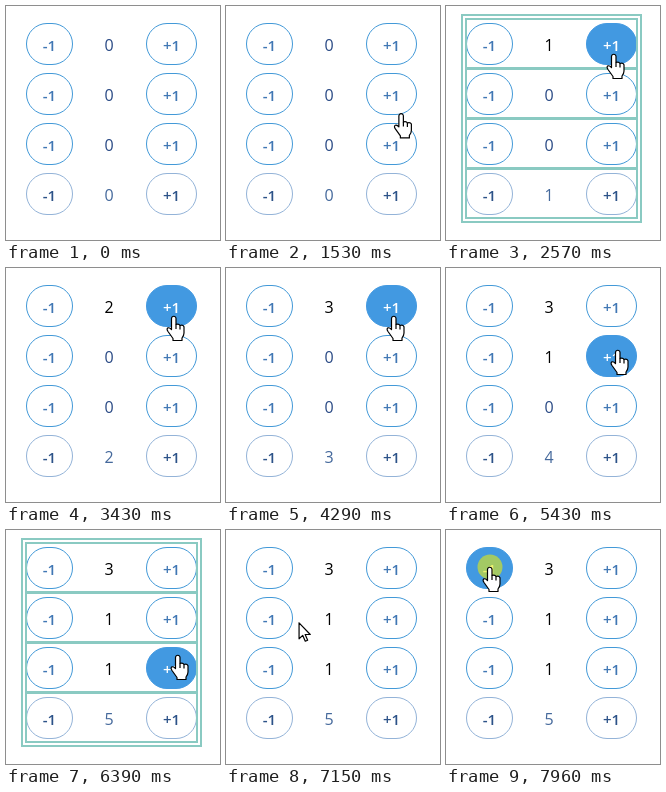
These frames come from a looping animation (214 px wide and 234 px high, 8000 ms). An HTML page:

```html
<!DOCTYPE html>
<html lang="en">
<head>
<meta charset="utf-8">
<title>Counters</title>
<style>
  html, body { margin: 0; width: 100%; height: 100%; overflow: hidden; background: #fff; }
  svg { display: block; width: 214px; height: 234px; }
  text { font: 16px "Open Sans", "Noto Sans", sans-serif; text-anchor: middle; fill: #000; }
  .btn rect { fill: #fff; stroke: #4299d8; }
  .btn text { font-size: 15px; font-weight: 600; fill: #4077b4; }
  .total .btn rect { stroke: #93b3d8; }
  .total .btn text { fill: #2c5288; }
  .zero { fill: #2a4a85; }
  .total .count { fill: #45699c; }
  .btn.hover rect { fill: #4299e1; stroke: #4299e1; }
  .btn.hover text { fill: #fff; }
  #flash { fill: none; stroke: #8acac2; stroke-width: 2; }
  #press { fill: rgba(228, 233, 17, .6); }
  #hand, #arrow { fill: #fff; stroke: #000; stroke-width: 1.2; stroke-linejoin: round; }
</style>
</head>
<body>
<svg viewBox="0 0 214 234">
  <g id="rows"></g>
  <g id="flash"><rect x="16" y="9" width="179" height="207"/></g>
  <circle id="press" r="12.5"/>
  <g id="cursor">
    <g id="hand">
      <path d="M-2.5 13.5V2.5a2.2 2.2 0 0 1 4.5 0V8.5q3-1 4 1q3-1 4 1.2V17q0 2.5-2 5V24.5H-1V22.5L-6 15.5q-1.8-2.7 0-3.6q1.6-.6 3.5 1.6z"/>
      <path d="M2 8.5V13M6 9.5V13.5" fill="none"/>
    </g>
    <path id="arrow" d="M0 0V16L3.7 12.6L6.2 18.4L8.6 17.4L6.1 11.7H11.2Z"/>
  </g>
</svg>
<script>
const LOOP = 8000;
const $ = id => document.getElementById(id);

function add(parent, tag, attrs, label) {
  const el = document.createElementNS("http://www.w3.org/2000/svg", tag);
  for (const key in attrs) el.setAttribute(key, attrs[key]);
  if (label !== undefined) el.textContent = label;
  parent.appendChild(el);
  return el;
}

const buttons = [], counts = [];

function addButton(row, label, x, y, w) {
  const el = add(row, "g", { class: "btn" });
  add(el, "rect", { x: x + .5, y: y + .5, width: w - 1, height: 41, rx: 20.5 });
  add(el, "text", { x: x + w / 2, y: y + 28 }, label);
  buttons.push({ el, x, y, w });
}

for (let i = 0; i < 4; i++) {
  const y = 17 + 50 * i;
  const row = add($("rows"), "g", { class: i === 3 ? "total" : "" });
  addButton(row, "-1", 20, y, 47);
  addButton(row, "+1", 140, y, 51);
  counts.push(add(row, "text", { x: 103, y: y + 28 }, 0));
  add($("flash"), "rect", { x: 20, y: y - 4, width: 171, height: 49 });
}

// Cursor moves: first step, last step, number of steps, end point
const enter = [192, 244];
const moves = [
  [1180, 1810, 10, 169, 55],
  [1960, 2160, 4, 168, 48],
  [4490, 4770, 5, 172, 82],
  [5780, 6130, 6, 172, 125],
  [6660, 7420, 12, 46, 84],
  [7490, 7700, 4, 44, 37]
];

// Clicks: press, count changes, outline ends, row
const clicks = [
  [2360, 2500, 2770, 0],
  [2970, 3170, 3430, 0],
  [3900, 4030, 4290, 0],
  [4970, 5170, 5430, 1],
  [6250, 6390, 6660, 2],
  [7960, 8100, 8400, 0]
];

const ease = p => 1 - Math.pow(1 - p, 1.4);

function cursorAt(t) {
  let [x, y] = enter;
  for (const [start, end, n, toX, toY] of moves) {
    if (t < start) break;
    const step = Math.floor((t - start) / ((end - start) / (n - 1)) + 1e-6) + 1;
    const p = ease(Math.min(1, step / n));
    x += (toX - x) * p;
    y += (toY - y) * p;
  }
  return [x, y];
}

function inside(b, x, y) {
  const r = 21;
  const dx = Math.max(b.x + r - x, 0, x - (b.x + b.w - r));
  return Math.hypot(dx, y - b.y - r) <= r;
}

const show = (el, on) => el.setAttribute("visibility", on ? "visible" : "hidden");

function draw(t) {
  const [x, y] = cursorAt(t);
  const over = buttons.find(b => inside(b, x, y));
  const at = `translate(${x} ${y})`;
  const active = t >= 1600;  // buttons do not react during the fast entry
  for (const b of buttons) b.el.classList.toggle("hover", active && b === over);

  const values = [0, 0, 0, 0];
  let pressed = false, flash = false;
  for (const [down, hit, off, row] of clicks) {
    pressed = pressed || (t >= down && t < hit);
    flash = flash || (t >= hit && t < off);
    if (t >= hit) { values[row]++; values[3]++; }
  }
  counts.forEach((el, i) => {
    el.textContent = values[i];
    el.setAttribute("class", values[i] ? "count" : "count zero");
  });

  show($("flash"), flash);
  show($("press"), pressed);
  show($("hand"), t >= 1180 && over);
  show($("arrow"), t >= 1180 && !over);
  $("cursor").setAttribute("transform", at);
  $("press").setAttribute("transform", at);
}

const begin = performance.now();
function tick() {
  draw((performance.now() - begin) % LOOP);
  requestAnimationFrame(tick);
}
tick();
</script>
</body>
</html>
```
